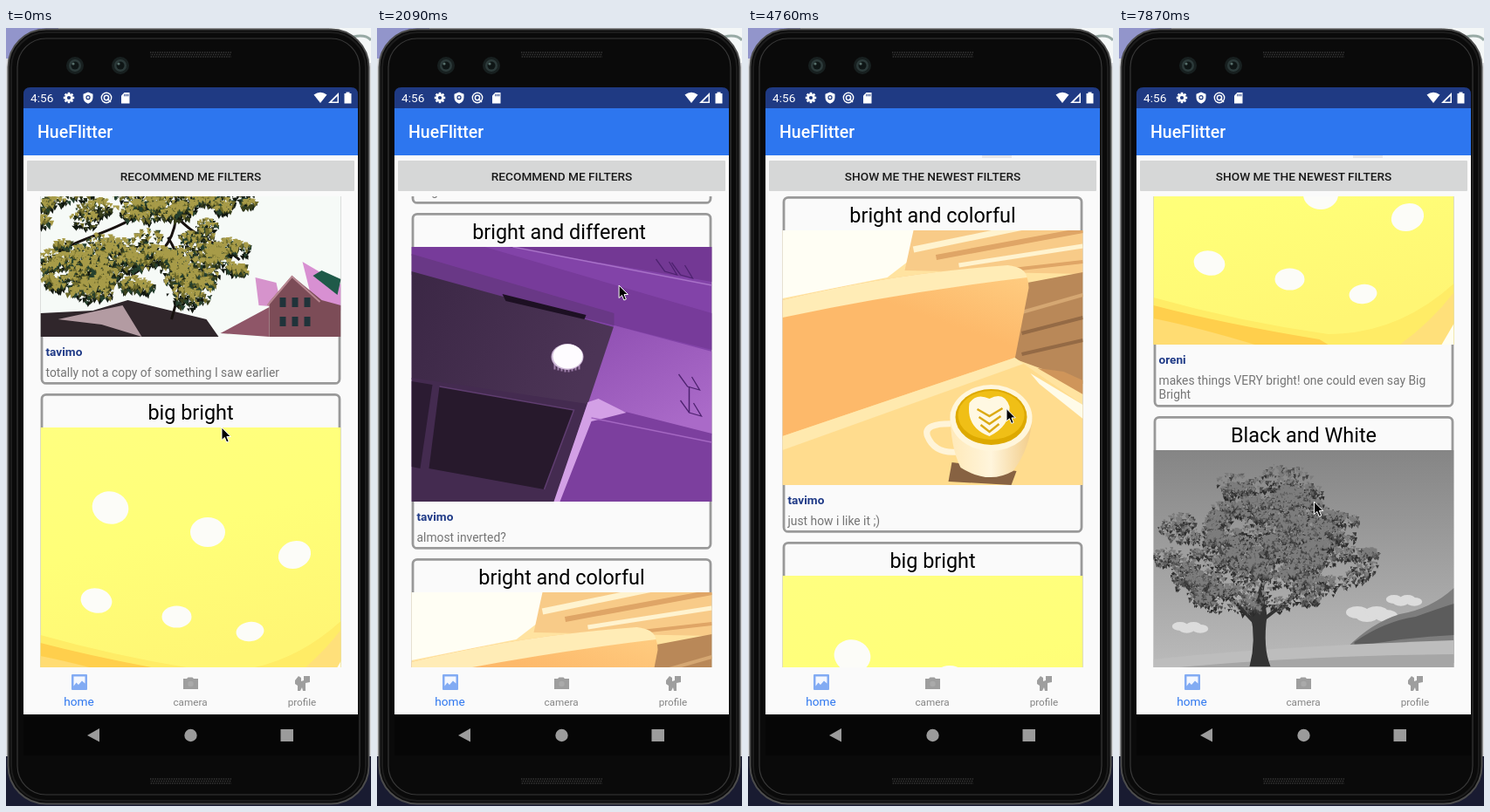
Write an HTML page that moves like this. It is 418 px wide and 892 px high and loops after 8 s.

```html
<!DOCTYPE html>
<html lang="en">
<head>
<meta charset="utf-8">
<title>Filter feed</title>
<style>
html, body { margin: 0; width: 100%; height: 100%; overflow: hidden; background: #0a0a0a; }
svg { display: block; width: 418px; height: 892px; }
text { font-family: Roboto, sans-serif; font-size: 13.65px; }
.mid { text-anchor: middle; }
.note { font-size: 13.85px; }
.cap { font-size: 23.4px; }
.bar { font-size: 19.5px; }
.tab { font-size: 11.7px; }
</style>
</head>
<body>
<svg id="stage" viewBox="0 0 418 892" xmlns="http://www.w3.org/2000/svg"></svg>
<script>
const LOOP = 8000, STEP = 148.4, TOP = 193, W = 344, H = 292;

// ---------- small builders ----------
const repeat = (n, f) => Array.from({ length: n }, (_, i) => f(i)).join('');
const poly = (pts, fill) => `<polygon points="${pts}" fill="${fill}"/>`;
const path = (d, fill) => `<path d="${d}" fill="${fill}"/>`;
const line = (d, stroke, w = 1, extra = '') => `<path d="${d}" fill="none" stroke="${stroke}" stroke-width="${w}" ${extra}/>`;
const box = (x, y, w, h, fill, extra = '') => `<rect x="${x}" y="${y}" width="${w}" height="${h}" fill="${fill}" ${extra}/>`;
const oval = (x, y, rx, ry, fill, turn = 0) =>
  `<ellipse cx="${x}" cy="${y}" rx="${rx}" ry="${ry}" fill="${fill}" transform="rotate(${turn} ${x} ${y})"/>`;
const disc = (x, y, r, fill) => oval(x, y, r, r, fill);
const text = (x, y, str, fill, extra = '') => `<text x="${x}" y="${y}" fill="${fill}" ${extra}>${str}</text>`;
const grad = (id, x, y, ...colors) => `<linearGradient id="${id}" x2="${x}" y2="${y}">` +
  colors.map((c, i) => `<stop offset="${i / (colors.length - 1)}" stop-color="${c}"/>`).join('') + '</linearGradient>';

function random(seed) {
  return () => {
    seed = (seed * 1664525 + 1013904223) >>> 0;
    return seed / 4294967296;
  };
}

// clumps of leaves spread over ellipses; colours run from shaded underside to lit top
function foliage(seed, blobs, clumps, colors, size) {
  const rnd = random(seed);
  const inside = (x, y, rx, ry) => {
    const a = rnd() * 6.283, r = Math.sqrt(rnd());
    return [x + rx * r * Math.cos(a), y + ry * r * Math.sin(a)];
  };
  const layers = colors.map(() => '');
  for (let i = 0; i < clumps; i++) {
    const [cx, cy] = inside(...blobs[i % blobs.length]);
    const w = 9 + rnd() * 12;
    for (let j = 0; j < 60; j++) {
      const [x, y] = inside(cx, cy, w, w * .65);
      const lit = (cy - y) / w + .5 + (rnd() - .5) * 1.2;
      const k = Math.max(0, Math.min(colors.length - 1, Math.floor(lit * colors.length)));
      const s = size * (.5 + rnd());
      layers[k] += `M${x.toFixed(1)} ${y.toFixed(1)}h${s.toFixed(1)}l${(-s * rnd()).toFixed(1)} ${s.toFixed(1)}z`;
    }
  }
  return layers.map((d, i) => path(d, colors[i])).join('');
}

// ---------- pictures ----------
function leaves() {
  const crown = [[70, 165, 78, 52], [180, 160, 76, 48], [60, 212, 62, 32], [160, 220, 75, 34]];
  return box(0, 0, W, H, '#f6faf7') +
    poly('0,265 60,262 100,250 190,272 204,292 0,292', '#30262b') +
    poly('20,272 94,256 116,292 70,278', '#b39ba2') +
    poly('206,288 262,258 262,292', '#8f5668') +
    poly('246,224 270,230 276,258 250,256', '#d693cc') +
    poly('300,206 344,232 344,262 310,246', '#d890d2') +
    poly('312,222 322,216 344,226 340,244', '#1f5a49') +
    poly('262,292 262,252 288,222 322,250 344,256 344,292', '#7c4c57') +
    line('M260 256L288 223L320 252', '#b78791', 2) +
    repeat(6, i => box(274 + i % 3 * 14, 247 + (i > 2) * 22, 7, 11, '#20333a')) +
    line('M155 130C160 180 142 195 104 222M152 150C182 185 210 185 228 204M130 130C110 165 76 168 28 190M146 178C166 210 162 232 150 272', '#17110f', 3) +
    foliage(7, crown, 105, ['#11170f', '#1e2817', '#39401d', '#25402e', '#6f6b2b', '#a79b48'], 4.5);
}

function lamps() {
  const spots = [[80, 92, 15], [191.5, 120, 0], [291, 146, -20], [64, 198.5, 12], [156, 217, 0], [240, 234, -8]];
  return box(0, 0, W, H, 'url(#sun)') +
    path('M0 238Q100 266 200 280Q280 280 344 222V292H0Z', '#ffec66') +
    path('M0 247Q80 268 190 286L200 292H0Z', '#ffcf4c') +
    path('M0 262Q50 272 116 292H0Z', '#ffdc72') +
    path('M282 292Q318 266 344 232V292Z', '#ffe07a') +
    path('M330 292L344 268V292Z', '#fffef0') +
    spots.map(([x, y, turn], i) => oval(x, y, 21 - i, 18.6 - 1.5 * i, '#fcfcf8', turn)).join('');
}

function hood() {
  const grip = (x, y) => line(`M${x} ${y}l10 14l14 4l-9 -15`, '#4e2270', 1.3);
  return box(0, 0, W, H, '#8243a8') +
    poly('0,0 84,0 344,76 344,118 232,90 0,10', '#773b9a') +
    poly('110,0 344,0 344,40', '#733894') +
    line('M116 0L344 44', '#a871c8', 1.5) +
    poly('0,8 232,76 232,90 0,32', '#693886') +
    poly('0,28 232,92 202,182 0,152', 'url(#steel)') +
    poly('104,54 200,78 198,83 108,62', '#1d1023') +
    poly('232,90 344,120 344,216 202,180', 'url(#wall)') +
    poly('0,150 202,180 164,292 0,292', '#442b50') +
    poly('32,160 186,187 152,278 20,254', '#27192c') +
    poly('0,154 24,158 10,254 0,252', '#2b1b32') +
    line('M32 160L186 187L152 278', '#5f3d70', 1.5) +
    poly('202,178 344,214 344,292 164,292', '#7c3f9e') +
    poly('202,178 214,174 246,190 206,200 170,292 163,292', '#d3a0e6') +
    line('M206 196L344 224', '#a467c2', 1.5) +
    grip(280, 14) + grip(298, 18) + grip(306, 146) + grip(308, 176) + line('M318 160v30', '#4e2270', 1.5) +
    repeat(8, i => line(`M${164 + i * 4} 132v${12 - Math.abs(i - 3.5)}`, '#9f80ab', 2)) +
    oval(178.5, 126, 18.5, 15, '#cdb8d6') + oval(179, 125.5, 17, 14, '#fefcff');
}

function coffee() {
  return box(0, 0, W, H, '#ffe3a0') +
    poly('0,0 190,0 120,54 0,78', '#fffef4') +
    poly('150,0 344,0 344,50 140,46', '#f8cb88') +
    repeat(4, i => line(`M${150 + i * 26} ${22 + i * 9}L344 ${-18 + i * 18}`, i % 2 ? '#dfa566' : '#fff3cf', 7 - i)) +
    poly('270,62 344,48 344,176 262,146', '#b98858') +
    repeat(3, i => line(`M274 ${94 + i * 24}L344 ${74 + i * 26}`, i ? '#946a45' : '#d5a772', 4)) +
    path('M0 80Q120 50 258 40Q282 42 282 66L266 148L0 240Z', 'url(#sofa)') +
    path('M0 80Q120 50 258 40Q278 42 280 54Q130 72 0 100Z', '#ffecb6') +
    poly('0,236 266,146 344,200 344,292 0,292', '#ffdc8e') +
    poly('0,236 266,146 276,153 0,252', '#ffe9ae') +
    poly('284,164 344,200 344,216 294,176', '#fffbe8') +
    poly('292,158 344,188 344,172 322,162', '#cf955a') +
    poly('194,266 226,270 268,276 262,292 190,288', '#876242') +
    line('M200 222Q160 220 166 236Q174 256 200 254', '#fff4d8', 7, 'stroke-linecap="round"') +
    path('M192 208Q192 248 204 272Q236 292 264 276Q284 250 286 214Z', 'url(#cup)') +
    oval(239, 215, 47, 38, '#fff6dc') + oval(239, 214, 41, 32, '#dda900') + oval(239, 212, 38, 28, '#f0bf16') +
    path('M237 236Q210 226 214 198Q222 186 237 193Q254 184 260 202Q261 224 237 236Z', '#fff8e2') +
    repeat(3, i => line(`M${223 + i * 2} ${205 + i * 9}L237 ${213 + i * 9}L${252 - i * 2} ${204 + i * 9}`, '#dcaa14', 2.5));
}

function oak() {
  const crown = [[130, 58, 55, 36], [68, 118, 66, 48], [190, 112, 64, 46], [112, 150, 92, 38], [130, 95, 70, 50]];
  const cloud = (x, y, s) => repeat(4, i => oval(x + (i - 1.5) * 11 * s, y + i % 2 * 4 * s, 13 * s, 7 * s, '#dcdcdc'));
  return box(0, 0, W, H, 'url(#sky)') +
    cloud(250, 186, 1) + cloud(287, 171, .7) + cloud(42, 202, .7) +
    path('M222 226Q250 198 282 188Q318 182 344 158V244H210Z', '#7d7d7d') +
    path('M230 220Q265 196 300 191Q325 182 344 176V212Q290 214 230 226Z', '#5c5c5c') +
    path('M0 240Q120 226 344 218V292H0Z', '#bdbdbd') +
    path('M0 252Q150 236 344 234V292H0Z', '#a6a6a6') +
    path('M110 248Q118 218 111 188L124 150L130 190Q125 226 134 248Z', '#333') +
    line('M118 200L80 160M121 198L178 154M121 190L132 94', '#333', 4) +
    foliage(21, crown, 165, ['#2c2c2c', '#3b3b3b', '#4b4b4b', '#606060', '#7c7c7c'], 3.4);
}

// ---------- cards ----------
const cards = {
  leaves: ['', leaves, 'tavimo', ['totally not a copy of something I saw earlier']],
  lamps: ['big bright', lamps, 'oreni', ['makes things VERY bright! one could even say Big', 'Bright']],
  hood: ['bright and different&#160;', hood, 'tavimo', ['almost inverted?']],
  coffee: ['bright and colorful', coffee, 'tavimo', ['just how i like it ;)']],
  oak: ['Black and White', oak, 'oreni', ['']]
};

function feed(id, names) {
  let y = 0, out = '';
  for (const name of names) {
    const [title, art, user, note] = cards[name];
    const pitch = 379 + 17 * note.length;
    out += `<g transform="translate(0 ${y})">` +
      box(41, 1.4, 341, pitch - 13, '#fafafa', 'rx="5" stroke="#999" stroke-width="2.8"') +
      text(211.5, 30, title, '#000', 'class="mid cap"') +
      `<g transform="translate(39.5 39)" clip-path="url(#photo)">${art()}</g>` +
      text(45.5, 352.5, user, '#1f3a87', 'font-weight="700"') +
      note.map((s, i) => text(45.5, 377 + 16 * i, s, '#757575', 'class="note"')).join('') + '</g>';
    y += pitch;
  }
  return `<g id="${id}">${out}</g>`;
}

// ---------- phone ----------
function phone() {
  const lens = x => disc(x, 43, 10, '#182020') + disc(x, 43, 7, '#2c3a3a') + disc(x, 43, 4.5, '#0e1515') + disc(x - 2, 41, 1.6, '#58706c');
  const grille = y => repeat(3, i => line(`M165 ${y + i * 2.5}H258`, '#383838', 1.4, `stroke-dasharray="1.4 1.3" stroke-dashoffset="${i}"`));
  const shell = (d, stroke, w) => box(d, d - 1, 418 - 2 * d, 893 - 2 * d, '#0a0a0a', `rx="${46 - d}" stroke="${stroke}" stroke-width="${w}"`);
  return box(0, 0, 418, 892, '#d9dade') +
    box(0, 0, 60, 35, '#9295cb') + box(0, 835, 418, 57, '#191b31') +
    box(370, 0, 48, 40, '#f4f7f7') + line('M398 10Q412 7 418 14', '#98aaa5', 3) +
    shell(2.5, '#4c4c4c', 2) + shell(6, '#1c1c1c', 2) + shell(13, '#383838', 1.2) +
    lens(79) + lens(131) + grille(28) + grille(861);
}

function statusBar() {
  const navy = '#1f3a83', white = '#fff';
  return path('M20 92V76Q20 68 28 68H395Q403 68 403 76V92Z', navy) +
    text(28, 85, '4:56', white) +
    repeat(8, i => box(70.7, 73.8, 2.6, 3, white, `transform="rotate(${i * 45} 72 80)"`)) +
    disc(72, 80, 4.7, white) + disc(72, 80, 2.1, navy) +
    path('M94 73.5l5.5 2.2v4q0 4.8 -5.5 7q-5.5 -2.2 -5.5 -7v-4z', white) + disc(94, 79.7, 2.6, navy) + disc(94, 79.7, 1.4, white) +
    disc(115, 80, 6.4, white) + disc(115, 80, 5, navy) + disc(115, 80, 3.4, white) + disc(115, 80, 1.9, navy) +
    line('M116 81l4 4', white, 1.5) +
    path('M135.5 74h6v12.5h-9.5v-9z', white) + repeat(3, i => box(135.3 + i * 2, 75.7, 1, 2.6, navy)) +
    path('M352.5 76.5Q360 71 367.5 76.5L360 86Z', white) +
    path('M381 74V86H369Z', white) + path('M379.5 78v6.5h-6.5z', navy) +
    path('M387.5 75h2v-1.5h4v1.5h2v11.5h-8z', white);
}

function tabs() {
  const grey = '#9e9e9e', nav = '#9b9b9b';
  return box(20, 733, 383, 54, '#fafafa') +
    box(75, 741, 18, 18, '#82abf3', 'rx="1"') + path('M77.5 743.5h13v8l-3.5 -3l-4 4.5l-2.5 -2.5l-3 4z', '#f3f7ff') +
    path('M203 746h4l1.5 -1.5h5l1.5 1.5h5v12h-17z', grey) + disc(211.5, 752, 3.2, '#aaa') +
    path('M331 748l4 -5l3 2v4l3 -1v-5h7v7l-5 1v9h-3l-1 -4l-2 4h-3v-6l-3 -2z', grey) +
    text(83.5, 777, 'home', '#2d76ef', 'class="mid"') +
    text(211, 777, 'camera', '#858585', 'class="mid tab"') + text(339, 777, 'profile', '#858585', 'class="mid tab"') +
    box(20, 787, 383, 47, '#060606') +
    poly('93,811 107,803 107,818.5', nav) + disc(211.5, 811, 7.2, nav) + box(314.5, 804, 14.5, 14, nav);
}

const stage = document.getElementById('stage');
stage.innerHTML = '<defs>' +
  grad('sun', .3, 1, '#ffff80', '#ffff78', '#fff674') +
  grad('steel', 1, .3, '#3b2745', '#4c3456') +
  grad('wall', .6, 1, '#8f4fb2', '#aa6ac8') +
  grad('sofa', .5, -1, '#fdb96a', '#ffd48a', '#ffe0a0') +
  grad('cup', 1, 0, '#ffe9b8', '#fff5dc', '#f2cc88') +
  grad('sky', 0, 1, '#858585', '#a4a4a4', '#c4c4c4') +
  `<clipPath id="photo"><rect width="${W}" height="${H}"/></clipPath>` +
  `<clipPath id="view"><rect x="39" y="${TOP}" width="345.5" height="540"/></clipPath></defs>` +
  phone() + box(20, 92, 383, 695, '#fafafa') + statusBar() + box(20, 92, 383, 54, '#2d76ef') +
  text(36, 126, 'HueFlitter', '#fff', 'class="bar" font-weight="500"') +
  box(268, 146, 34, 3, '#e6e6e8', 'id="strip"') +
  box(24, 153, 376, 36, '#ddd', 'id="shade" rx="2"') +
  box(24, 152, 375, 35, '#d6d7d7', 'id="button" rx="1"') +
  text(211.5, 175, '', '#191919', 'id="label" class="mid" font-weight="500"') +
  '<g clip-path="url(#view)">' + feed('recent', ['leaves', 'lamps', 'hood', 'coffee']) + feed('picked', ['coffee', 'lamps', 'oak']) + '</g>' +
  tabs() +
  '<path id="arrow" d="M0 0V14.5L3.4 11.4L5.7 17L8.2 16L5.9 10.5H10.3Z" fill="#000" stroke="#fff"/>';

// ---------- motion: [step, value...], eased between stops ----------
const CLICK = 26, SWAP = 27, RELEASE = 29;
const scroll = [[0, 170], [7, 459], [9, 459], [16, 872], [18, 872], [25, 565], [CLICK, 565],
  [SWAP, 0], [40, 0], [47, 483], [48, 483], [54, 563]];
const pointer = [[0, 247, 458], [3, 270, 310], [7, 231, 565], [9, 225, 578], [16, 290, 225], [18, 290, 225],
  [22, 262, 500], [25, 284, 103], [CLICK, 273, 155], [30, 310, 411], [31, 310, 411], [34, 256, 509], [35, 256, 509],
  [37, 204, 632], [40, 204, 632], [45, 307, 280], [48, 210, 640], [53, 223.5, 543]];

function at(stops, k) {
  const i = Math.max(1, stops.findIndex(s => s[0] >= k));
  const [t0, ...from] = stops[i - 1], [t1, ...to] = stops[i];
  const u = (k - t0) / (t1 - t0), e = u * u * (3 - 2 * u);
  return from.map((v, j) => v + (to[j] - v) * e);
}

const [strip, shade, button, label, recent, picked, arrow] =
  ['strip', 'shade', 'button', 'label', 'recent', 'picked', 'arrow'].map(id => document.getElementById(id));
const show = (el, on) => el.setAttribute('visibility', on ? 'visible' : 'hidden');
const move = (el, x, y) => el.setAttribute('transform', `translate(${x} ${y})`);

function draw(t) {
  const k = Math.min(53, Math.floor(t % LOOP / STEP));
  const pressed = k >= CLICK && k < RELEASE;
  const y = TOP - Math.round(at(scroll, k)[0]);
  move(recent, 0, y);
  move(picked, 0, y);
  move(arrow, ...at(pointer, k));
  show(recent, k < SWAP);
  show(picked, k >= SWAP);
  show(strip, k >= CLICK - 1);
  show(shade, pressed);
  button.setAttribute('fill', pressed ? '#bbbcbc' : '#d6d7d7');
  label.textContent = k < CLICK ? 'RECOMMEND ME FILTERS' : 'SHOW ME THE NEWEST FILTERS';
}

const start = performance.now();
function tick(now) {
  draw(Math.max(0, now - start));
  requestAnimationFrame(tick);
}
draw(0);
requestAnimationFrame(tick);
</script>
</body>
</html>
```
